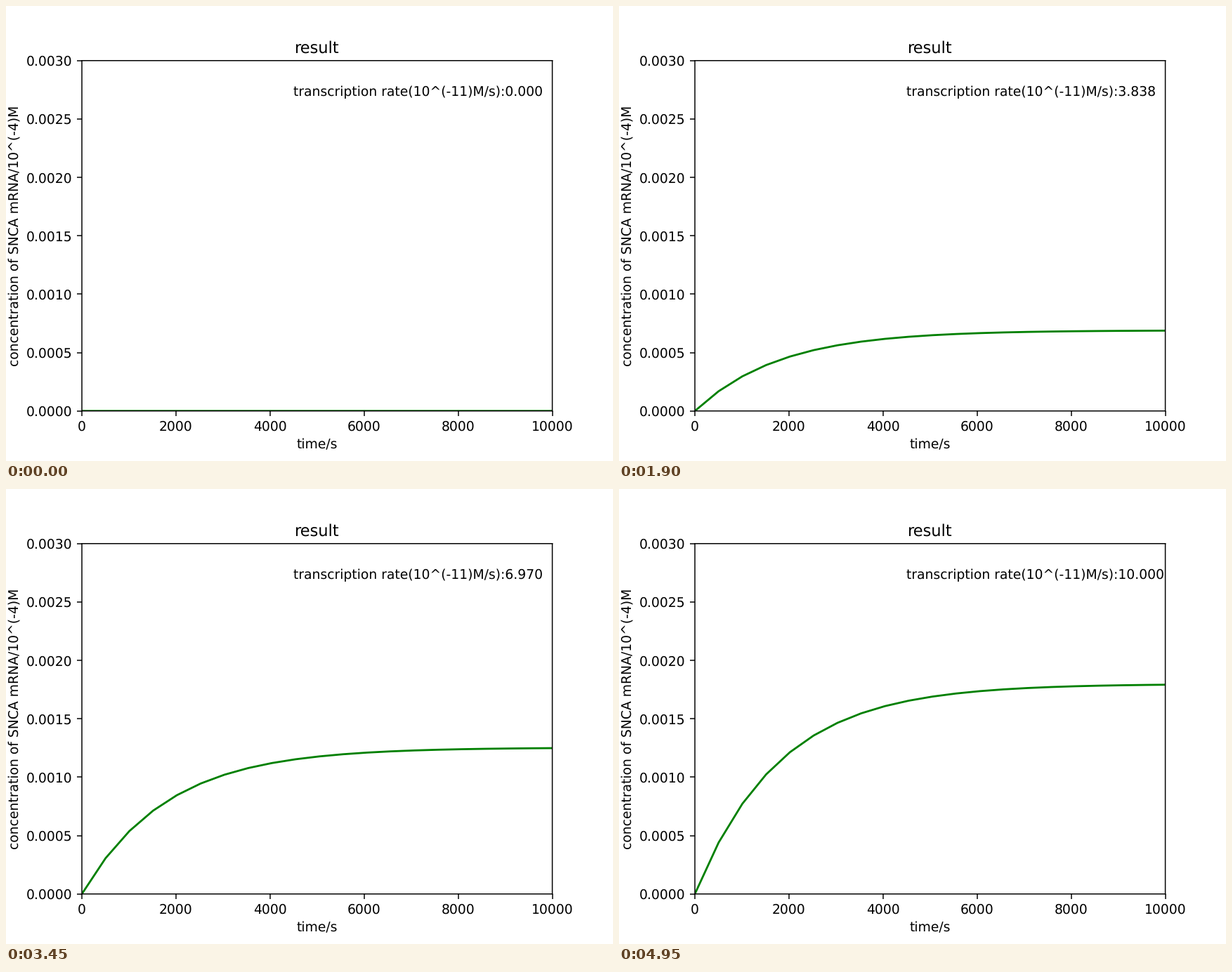
A matplotlib script for the animation above (5000 ms loop, 864x648 px).

```python
import matplotlib.pyplot as plt
import numpy as np
from matplotlib.animation import FuncAnimation

FRAMES = 100
DECAY = 5.56e-4  # mRNA degradation rate, 1/s

# Unsnapped lines and unhinted glyphs keep true sub-pixel geometry.
plt.rcParams.update({
    "font.family": "DejaVu Sans",
    "path.snap": False,
    "text.hinting": "no_hinting",
})

times = np.linspace(0, 50000, 100)
rates = np.linspace(0, 10, FRAMES)


def concentration(rate):
    """mRNA level in 1e-4 M for a rate given in 1e-11 M/s."""
    return rate * 1e-7 / DECAY * (1 - np.exp(-DECAY * times))


fig, ax = plt.subplots(figsize=(6.4, 4.8), dpi=135)
ax.set_xlim(0, 10000)
ax.set_ylim(0, 0.003)
ax.set_title("result")
ax.set_xlabel("time/s")
ax.set_ylabel("concentration of SNCA mRNA/10^(-4)M")

curve, = ax.plot([], [], color="green", lw=1.5)
label = ax.text(0.45, 0.9, "", transform=ax.transAxes)


def update(i):
    curve.set_data(times, concentration(rates[i]))
    label.set_text(f"transcription rate(10^(-11)M/s):{rates[i]:.3f}")
    return curve, label


anim = FuncAnimation(fig, update, frames=FRAMES, interval=50,
                     init_func=lambda: update(0), repeat=True, repeat_delay=0)
plt.show()
```
